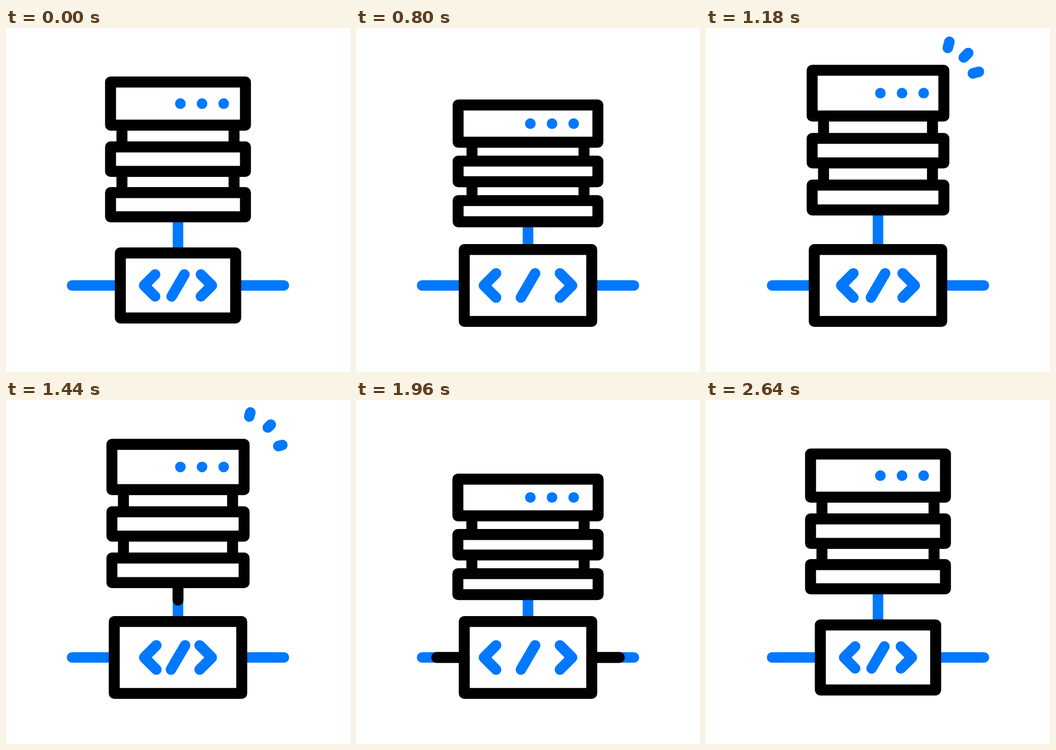
An HTML page with a canvas that plays this animation: 640 px wide and 640 px high, repeating every 3 s.

```html
<!DOCTYPE html>
<html lang="en">
<head>
<meta charset="utf-8">
<title>Server and code</title>
<style>
  html, body { margin: 0; height: 100%; overflow: hidden; background: #fff; }
  canvas { display: block; width: 640px; height: 640px; }
</style>
</head>
<body>
<canvas id="stage" width="640" height="640"></canvas>
<script>
const ctx = document.getElementById('stage').getContext('2d');
const BLUE = '#0078ff', BLACK = '#000';
const LOOP = 3000, THICK = 20.4, THIN = 19.6, CX = 320, CY = 479;

// Server pose: left edge, post x, then top and bottom edge of each unit
const REST = [184.3, 215.7, 90.3, 191, 211, 277, 296, 361.5];
const SQUASH = [179, 215.5, 140, 228, 242, 300, 314, 373];
const STRETCH = [188.2, 219, 60.5, 168, 190, 257, 278.5, 346];

const serverKeys = [[220, REST], [690, SQUASH], [1300, STRETCH], [1880, SQUASH], [2420, REST]];
const boxKeys = [[220, 1], [765, 1.105], [2095, 1.105], [2640, 1]];
const spreadKeys = [[220, 63], [765, 82], [800, 82], [1400, 62.5], [1940, 82], [2095, 82], [2640, 63]];

const clamp01 = x => Math.min(1, Math.max(0, x));
const progress = (t, from, to) => clamp01((t - from) / (to - from));
const smooth = x => x * x * (3 - 2 * x);
const mix = (a, b, p) => Array.isArray(a) ? a.map((v, i) => mix(v, b[i], p)) : a + (b - a) * p;

function tween(t, keys) {
  const next = keys.findIndex(k => t < k[0]);
  if (next === 0) return keys[0][1];
  if (next < 0) return keys[keys.length - 1][1];
  const [t0, a] = keys[next - 1], [t1, b] = keys[next];
  return mix(a, b, smooth(progress(t, t0, t1)));
}

function line(points, color, width = THIN, cap = 'round') {
  ctx.strokeStyle = color;
  ctx.lineWidth = width;
  ctx.lineCap = cap;
  ctx.beginPath();
  points.forEach(([x, y]) => ctx.lineTo(x, y));
  ctx.stroke();
}

// Outlined box given by its outer edges, mirrored about the centre line
function frame(left, top, bottom) {
  const h = THICK / 2;
  ctx.strokeStyle = BLACK;
  ctx.lineWidth = THICK;
  ctx.strokeRect(left + h, top + h, 2 * (CX - left - h), bottom - top - THICK);
}

// Black stretch travelling along a wire from a to b
function pulse(t, a, b, head, tail) {
  const p = smooth(progress(t, ...head)), q = smooth(progress(t, ...tail));
  if (p > q) line([mix(a, b, q), mix(a, b, p)], BLACK, THICK);
}

function drawWires(t, serverBottom, boxTop, boxLeft) {
  const top = [CX, serverBottom - 10], end = [CX, boxTop + 10];
  line([top, end], BLUE, THIN, 'butt');
  pulse(t, top, end, [1320, 1580], [1480, 1740]);
  for (const side of [-1, 1]) {
    const inner = [CX + side * (CX - boxLeft - 10), CY], outer = [CX + side * 197, CY];
    line([inner, outer], BLUE);
    pulse(t, inner, outer, [1780, 2080], [1960, 2240]);
  }
}

function drawServer([left, post, ...edges]) {
  for (const x of [post, 2 * CX - post])
    for (const i of [1, 3]) line([[x, edges[i] - 5], [x, edges[i + 1] + 5]], BLACK, THICK, 'butt');
  for (let i = 0; i < 6; i += 2) frame(left, edges[i], edges[i + 1]);
  ctx.fillStyle = BLUE;
  for (const x of [324.4, 364.7, 405]) {
    ctx.beginPath();
    ctx.arc(x, (edges[0] + edges[1]) / 2, 9.9, 0, 2 * Math.PI);
    ctx.fill();
  }
}

function drawCode(scale, spread) {
  const arm = 20.4 * scale, lean = 11.9 * scale;
  for (const side of [-1, 1]) {
    const tip = CX + side * spread, back = tip - side * arm;
    line([[back, CY - arm], [tip, CY], [back, CY + arm]], BLUE);
  }
  line([[CX + lean, CY - arm], [CX - lean, CY + arm]], BLUE);
}

function drawSparks(t, top) {
  const p = progress(t, 1000, 1640);
  if (p <= 0 || p >= 1) return;
  const tail = mix(-8, 18, p), tip = mix(-8, 18, 1 - (1 - p) ** 4);
  for (const [x, y, degrees] of [[450, -32, 75], [480, -14, 45], [497, 16, 15]]) {
    const a = degrees * Math.PI / 180;
    line([tail, tip].map(s => [x + s * Math.cos(a), top + y - s * Math.sin(a)]), BLUE);
  }
}

function draw(t) {
  ctx.fillStyle = '#fff';
  ctx.fillRect(0, 0, 640, 640);
  ctx.lineJoin = 'round';

  const server = tween(t, serverKeys), scale = tween(t, boxKeys);
  const boxLeft = CX - 107.3 * scale - THICK / 2;
  const halfHeight = 60.5 * scale + THICK / 2;

  drawWires(t, server[7], CY - halfHeight, boxLeft);
  drawServer(server);
  frame(boxLeft, CY - halfHeight, CY + halfHeight);
  drawCode(scale, tween(t, spreadKeys));
  drawSparks(t, server[2]);
}

function tick() {
  draw(performance.now() % LOOP);
  requestAnimationFrame(tick);
}
tick();
</script>
</body>
</html>
```
